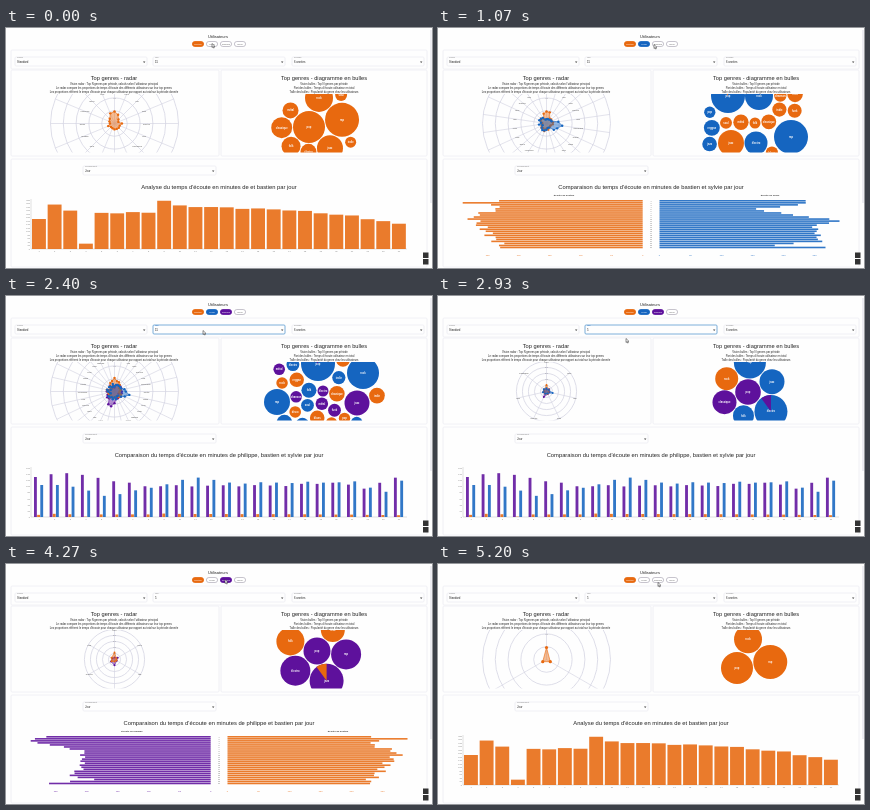
Animation of 426 by 240 pixels, one loop 5.27 s. Source, as an HTML page with a canvas:

```html
<!DOCTYPE html>
<html lang="fr">
<head>
<meta charset="utf-8">
<style>
  html, body { margin: 0; width: 426px; height: 240px; overflow: hidden; background: #fefefe; }
  canvas { display: block; }
</style>
</head>
<body>
<canvas id="stage" width="426" height="240"></canvas>
<script>
const ctx = document.getElementById('stage').getContext('2d');
const LOOP = 5270, CX = 108.5, CY = 95.5, BASE = 221, DAYS = 24, PITCH = 15.65, TAU = Math.PI * 2;
const INK = '#222', GRID = '#d0d0e0', LINE = '#ececf3';
const COLORS = { o: '#e8690f', b: '#1565c0', p: '#5e119c' };
const USERS = { o: 'bastien', b: 'sylvie', p: 'philippe', r: 'lucas' };
const FAVOURITE = { o: 0, b: .28, p: .55 }; // direction of each user's top genre, in turns
const GENRES = ['pop', 'rock', 'rap', 'jazz', 'électro', 'folk', 'classique', 'métal', 'indie',
  'soul', 'funk', 'reggae', 'blues', 'chanson', 'disco'];

const smooth = u => { u = Math.min(1, Math.max(0, u)); return u * u * (3 - 2 * u); };

function random(seed) {
  return () => (seed = seed * 16807 % 2147483647) / 2147483647;
}

// Value at x on the broken line through [x, y] points
function along(points, x) {
  const i = Math.max(1, points.findIndex(p => p[0] >= x));
  const [x0, y0] = points[i - 1], [x1, y1] = points[i];
  return y0 + (y1 - y0) * (x - x0) / (x1 - x0);
}

// Minutes per day, as bar heights
const perDay = (points, wobble) =>
  Array.from({ length: DAYS }, (_, d) => along(points, d) + wobble * Math.sin(d * 2.3));
const solo = perDay([[0, 30], [1, 44], [2, 39], [3, 5], [4, 36], [7, 36.5], [8, 48.5], [9, 43], [16, 39], [20, 33], [23, 25]], .6);
const shared = {
  o: perDay([[0, 36], [1, 44], [3, 35], [8, 43], [23, 35]], 1.5),
  p: perDay([[0, 40], [2, 44.5], [4, 39], [7, 31], [16, 31.5], [19, 34.5], [21, 29], [23, 39]], .7),
  b: perDay([[0, 32], [2, 31], [4, 21], [6, 26], [10, 40], [12, 34], [20, 35], [22, 25], [23, 36]], .7)
};

// Fixed bubbles first, then a tangent ring around the first one, then small ones spiralling outwards
function pack({ seeds, ring = [], from, fill = 0, colors, on }) {
  const gap = .8, rand = random(fill + 7);
  const placed = seeds.map(([x, y, r]) => ({ x, y, r }));
  const [core] = placed;
  let angle = from * Math.PI / 180;
  ring.forEach((r, i) => {
    const far = core.r + r + gap;
    if (i) {
      const last = ring[i - 1], near = core.r + last + gap, side = last + r + gap;
      angle += Math.acos((near * near + far * far - side * side) / (2 * near * far));
    }
    placed.push({ x: core.x + far * Math.cos(angle), y: core.y + far * Math.sin(angle), r });
  });
  for (let n = 0; n < fill; n++) {
    const r = 5.5 + 2.5 * rand();
    for (let k = 0; k < 3000; k++) {
      const d = Math.sqrt(k), x = 317 + 1.25 * d * Math.cos(k * 2.4), y = 95 + d * Math.sin(k * 2.4);
      if (placed.every(p => Math.hypot(p.x - x, p.y - y) > p.r + r + gap)) {
        placed.push({ x, y, r });
        break;
      }
    }
  }
  placed.forEach((p, i) => p.key = colors[i] || on[Math.floor(rand() * on.length)]);
  const biggest = placed.reduce((a, b) => b.r > a.r ? b : a);
  biggest.slice = [...on].find(key => key !== biggest.key);
  return placed;
}

const scenes = [
  { at: -1000, on: 'o', top: 15, axes: 16, colors: 'o',
    seeds: [[303, 99, 16]], from: -71, ring: [14, 17, 13, 8, 9.5, 10.5, 8], fill: 2 },
  { at: 350, on: 'ob', top: 15, axes: 22, colors: 'bbbob',
    seeds: [[290, 68, 17], [321, 68, 14], [353, 109, 17], [293, 115, 13], [318, 115, 11.5]], fill: 14 },
  { at: 1200, on: 'pob', top: 15, axes: 28, colors: 'bbbp',
    seeds: [[312, 68, 17], [357, 77, 16], [271, 106, 13], [351, 107, 12.5]], fill: 22 },
  { at: 2650, on: 'pob', top: 5, axes: 7, colors: 'pobbbbp',
    seeds: [[312, 96, 12.8]], from: 212, ring: [11.5, 16, 12.5, 16.5, 10.5, 12] },
  { at: 4000, on: 'po', top: 5, axes: 6, colors: 'popppo',
    seeds: [[313, 87, 13.5]], from: -53, ring: [12, 15, 17, 15, 14] },
  { at: 4450, on: 'o', top: 5, axes: 3, colors: 'ooo',
    seeds: [[299, 104, 16]], from: -69, ring: [14, 17] }
];
scenes.forEach((scene, i) => {
  const rand = random(i + 11);
  scene.bubbles = pack(scene);
  scene.radar = [...scene.on].map(key => [key, Array.from({ length: scene.axes }, (_, k) => {
    const turn = Math.abs(k / scene.axes - FAVOURITE[key]);
    const away = Math.min(turn, 1 - turn);
    return 4 + 4 * rand() + 8 * Math.exp(-200 * away * away);
  })]);
});

// Time, x, y
const pointer = [[0, 206, 17], [400, 206, 17], [900, 216, 18], [1250, 216, 18], [1750, 197, 36], [2500, 197, 36],
  [2930, 188, 44], [3600, 206, 17], [3850, 206, 17], [4200, 219, 17], [5270, 220, 20]];

function text(str, x, y, size, align = 'center', color = INK, weight = '') {
  ctx.font = `${weight} ${size}px "Liberation Sans", sans-serif`;
  ctx.textAlign = align;
  ctx.fillStyle = color;
  ctx.fillText(str, x, y);
}

function rect(x, y, w, h, color) {
  ctx.fillStyle = color;
  ctx.fillRect(x, y, w, h);
}

function stroke(color, width) {
  ctx.strokeStyle = color;
  ctx.lineWidth = width;
  ctx.stroke();
}

function line(x1, y1, x2, y2, color, width = .6) {
  ctx.beginPath();
  ctx.moveTo(x1, y1);
  ctx.lineTo(x2, y2);
  stroke(color, width);
}

function polygon(points, fill) {
  ctx.beginPath();
  points.forEach(p => ctx.lineTo(...p));
  ctx.closePath();
  ctx.fillStyle = fill;
  ctx.fill();
}

function box(x, y, w, h, radius, border, fill = '#fefefe') {
  ctx.beginPath();
  ctx.roundRect(x, y, w, h, radius);
  ctx.fillStyle = fill;
  ctx.fill();
  stroke(border, .8);
}

function disc(x, y, r, color) {
  ctx.beginPath();
  ctx.arc(x, y, r, 0, TAU);
  ctx.fillStyle = color;
  ctx.fill();
}

function clipped(x, y, w, h, draw) {
  ctx.save();
  ctx.beginPath();
  ctx.rect(x, y, w, h);
  ctx.clip();
  draw();
  ctx.restore();
}

function select(label, value, x, y, w, focused) {
  box(x, y, w, 9, 1, focused ? '#5b9bd0' : '#ebebf1');
  text(label, x + 2, y + .8, 2.2, 'left', focused ? COLORS.b : '#888');
  text(value, x + 2, y + 6.2, 2.8, 'left');
  const ax = x + w - 4, ay = y + 4.5;
  polygon([[ax, ay], [ax + 2.4, ay], [ax + 1.2, ay + 1.4]], '#444');
}

function header(scene, focused) {
  text('Utilisateurs', 212, 9.5, 4);
  Object.keys(USERS).forEach((key, i) => {
    const x = 192 + i * 14, active = scene.on.includes(key);
    box(x - 5.6, 13.5, 11.2, 5, 2.5, active ? COLORS[key] : '#b9b5c0', active ? COLORS[key] : '#fff');
    text(USERS[key], x, 16.9, 2.3, 'center', active ? '#fff' : '#666');
  });
  select('Genre', 'Standard', 9, 29, 132);
  select('Top', scene.top, 147, 29, 132, focused);
  select('Période', '6 années', 286, 29, 132);
}

function panel(x, title, notes) {
  text(title, x, 52, 5.7);
  notes.forEach((note, i) => text(note, x, 56.6 + i * 4.3, 2.7));
}

function panels() {
  [[5, 22, 416, 19], [5, 42, 208, 86], [215, 42, 206, 86], [5, 131, 416, 108]]
    .forEach(p => box(...p, 1, LINE));
  line(425, 2, 425, 175, '#dcdce6', 1);
  panel(108, 'Top genres - radar', [
    'Vision radar : Top N genres par période, calculs selon l’utilisateur principal',
    'Le radar compare les proportions de temps d’écoute des différents utilisateurs sur leur top genres',
    'Les proportions réfèrent le temps d’écoute pour chaque utilisateur par rapport au total sur la période donnée']);
  panel(318, 'Top genres - diagramme en bulles', [
    'Vision bulles : Top N genres par période',
    'Part des bulles : Temps d’écoute utilisateur en total',
    'Taille des bulles : Popularité du genre chez les utilisateurs']);
}

function radar({ axes, radar }, grow) {
  const scale = .47 + .53 * grow, outer = 64 * scale, dense = axes > 9;
  const at = (k, r) => {
    const a = (k / axes - .25) * TAU;
    return [CX + r * Math.cos(a), CY + r * Math.sin(a)];
  };
  for (let ring = 1; ring <= 5; ring++) {
    const r = outer * ring / 5;
    ctx.beginPath();
    ctx.arc(CX, CY, r, 0, TAU);
    stroke(GRID, .7);
    text(ring * 20, CX, CY - r + 1, 2.2, 'center', '#666');
  }
  for (let k = 0; k < axes; k++) {
    line(CX, CY, ...at(k, outer), GRID);
    if (dense || scale < .7) {
      const [x, y] = at(k, dense ? 32 : outer - 1);
      text(GENRES[k % GENRES.length], x, y + 1, 2.3, 'center', '#555');
    }
  }
  for (const [key, values] of radar) {
    const points = values.map((v, k) => at(k, v * scale));
    ctx.globalAlpha = .45;
    polygon(points, COLORS[key]);
    ctx.globalAlpha = 1;
    stroke(COLORS[key], .6);
    points.forEach(p => disc(...p, dense ? 1.2 : 1 + .6 * grow, COLORS[key]));
  }
}

function bubbles(list, grow) {
  list.forEach(({ x, y, r, key, slice }, i) => {
    x -= 2 * (1 - grow);
    disc(x, y, r, COLORS[key]);
    if (slice) {
      ctx.beginPath();
      ctx.moveTo(x, y);
      ctx.arc(x, y, r, -.35 * TAU, -.25 * TAU);
      ctx.fillStyle = COLORS[slice];
      ctx.fill();
    }
    text(GENRES[i % GENRES.length], x, y + 1, 2.6, 'center', '#fff', 'bold');
  });
}

function columns(series, width, inset, step) {
  line(25, 171, 25, BASE, '#bbb', .5);
  line(25, BASE, 401, BASE, '#bbb', .5);
  for (let i = 0; i * step <= 49; i++) text(i * 20, 24, BASE + .8 - i * step, 2.2, 'right', '#666');
  for (let d = 0; d < DAYS; d++) {
    const x = 26 + d * PITCH;
    series.forEach(([key, values], i) =>
      rect(x + inset + i * width, BASE - values[d], width - .3, values[d], COLORS[key]));
    text(d + 1, x + 7, 224.2, 2.2, 'center', '#666');
  }
}

function mirrored(keys) {
  keys.forEach((key, side) => {
    const unit = 180 / Math.max(...shared[key]);
    const edge = side ? 221.5 : 204.7, dir = side ? 1 : -1;
    text('Écoute de ' + USERS[key], side ? 332 : 126, 168, 2.4, 'center', INK, 'bold');
    shared[key].forEach((v, d) => rect(edge, 172 + d * 2.03, dir * v * unit, 1.6, COLORS[key]));
    for (let i = 0; i < 6; i++) text(i * 50, edge + dir * i * 31, 227.5, 2.4, 'center', COLORS[key]);
  });
  for (let d = 0; d < DAYS; d++) text(d + 1, 213, 173.5 + d * 2.03, 1.9, 'center', '#555');
}

function dayChart({ on }) {
  select('Groupement', 'Jour', 77, 138, 133);
  const keys = [...on], names = keys.map(k => USERS[k]), last = names.pop();
  const verb = names.length ? 'Comparaison' : 'Analyse';
  const who = [names.join(', '), 'et', last].filter(Boolean).join(' ');
  text(`${verb} du temps d'écoute en minutes de ${who} par jour`, 213, 161, 5.8);
  ctx.globalAlpha = .88;
  if (keys.length === 1) columns([['o', solo]], 14.2, 0, 3.5);
  else if (keys.length === 2) mirrored(keys);
  else columns(keys.map(k => [k, k === 'o' ? solo.map(v => v / 14) : shared[k]]), 3.15, 2, 6.1);
  ctx.globalAlpha = 1;
}

function cursor(t) {
  const i = pointer.findIndex(p => p[0] > t);
  const [t0, x0, y0] = pointer[i - 1], [t1, x1, y1] = pointer[i];
  const u = smooth((t - t0) / (t1 - t0));
  ctx.save();
  ctx.translate(x0 + (x1 - x0) * u, y0 + (y1 - y0) * u - 1.5);
  polygon([[0, 0], [0, 4], [1, 3.2], [1.7, 4.6], [2.3, 4.3], [1.7, 3], [2.9, 2.8]], '#fff');
  stroke(INK, .5);
  ctx.restore();
}

function draw(t) {
  const scene = scenes.findLast(s => t >= s.at);
  const grow = smooth((t - scene.at - 280) / 420);
  rect(0, 0, 426, 240, '#fefefe');
  panels();
  header(scene, t > 1700 && t < 3600);
  clipped(6, 66, 206, 58.5, () => radar(scene, grow));
  clipped(216, 66, 204, 58.5, () => bubbles(scene.bubbles, grow));
  dayChart(scene);
  rect(417, 224.5, 5.5, 5.5, '#333');
  rect(417, 231, 5.5, 5.5, '#333');
  cursor(t);
}

const start = performance.now();
function tick() {
  draw((performance.now() - start) % LOOP);
  requestAnimationFrame(tick);
}
tick();
</script>
</body>
</html>
```
